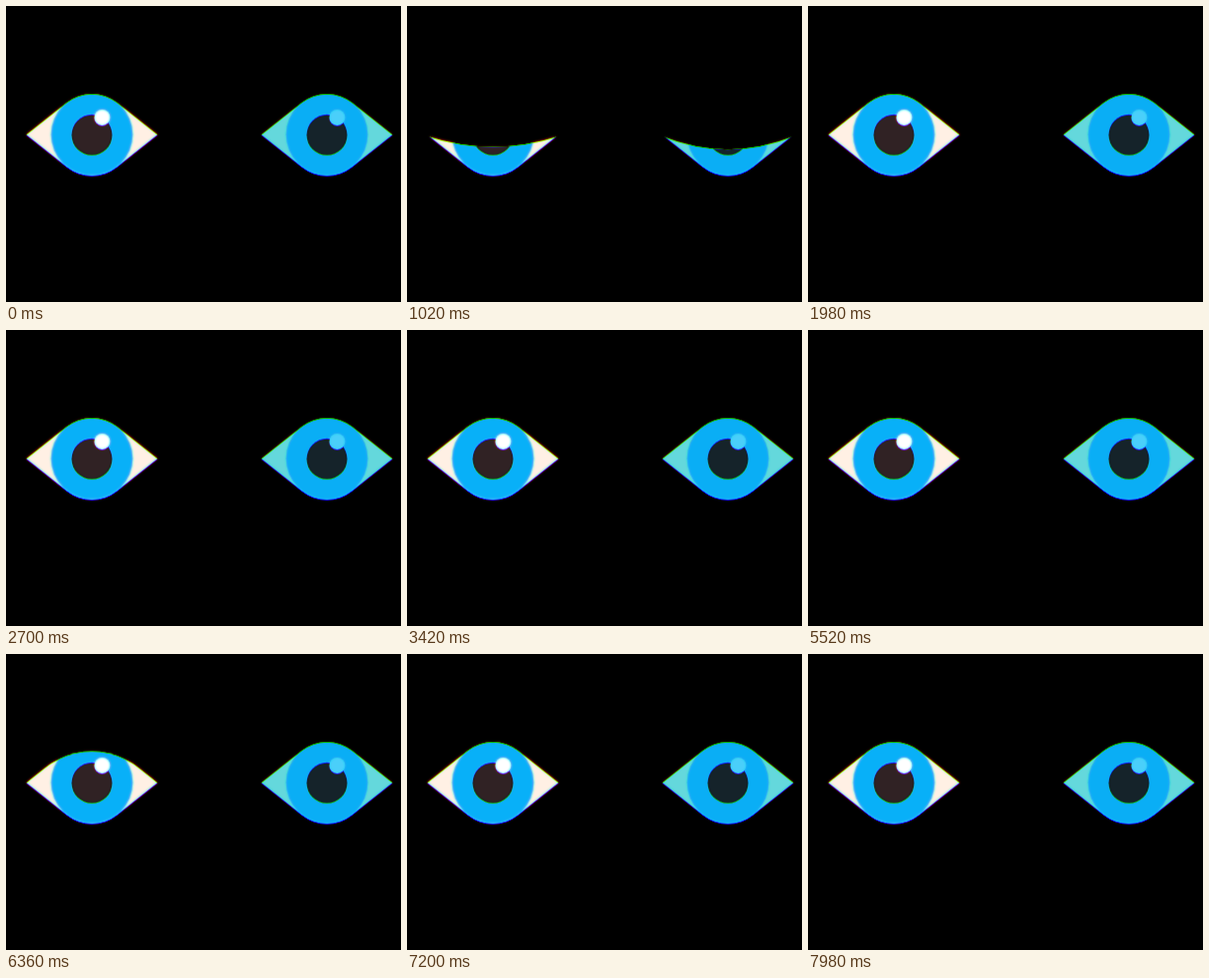
An HTML page for the animation above (8000 ms loop, 400x300 px).

```html
<!DOCTYPE html>
<html lang="en">
<head>
<meta charset="utf-8">
<title>Blinking eyes</title>
<style>
  html, body { margin: 0; width: 100%; height: 100%; overflow: hidden; background: #000; }
  svg { display: block; width: 100vw; height: 100vh; }
  .left { --white: #fff0e4; --iris: #08b0f8; --pupil: #302224; --glint: #fff; }
  .right { --white: #64d8dc; --iris: #0aaef5; --pupil: #15232a; --glint: #4acffa; }
  .white { fill: var(--white); }
  .iris { fill: var(--iris); }
  .pupil { fill: var(--pupil); }
  .glint { fill: var(--glint); }
</style>
</head>
<body>
<svg viewBox="0 0 400 300">
  <defs>
    <!-- Red spreads a little and blue sits low, giving coloured fringes -->
    <filter id="fringe" filterUnits="userSpaceOnUse" x="0" y="0" width="400" height="300" color-interpolation-filters="sRGB">
      <feGaussianBlur in="SourceGraphic" stdDeviation=".9" result="wide"/>
      <feGaussianBlur in="SourceGraphic" stdDeviation=".6" result="soft"/>
      <feColorMatrix in="wide" values="1 0 0 0 0  0 0 0 0 0  0 0 0 0 0  0 0 0 0 1" result="red"/>
      <feColorMatrix in="soft" values="0 0 0 0 0  0 1 0 0 0  0 0 0 0 0  0 0 0 0 1" result="green"/>
      <feColorMatrix in="soft" values="0 0 0 0 0  0 0 0 0 0  0 0 1 0 0  0 0 0 0 1"/>
      <feOffset dy="1" result="blue"/>
      <feBlend in="red" in2="green" mode="screen"/>
      <feBlend in2="blue" mode="screen"/>
    </filter>
    <clipPath id="outline">
      <path d="M-66.5 0 L-25.6 -32.5 A41.4 41.4 0 0 1 25.6 -32.5 L66.5 0 L25.6 32.5 A41.4 41.4 0 0 1 -25.6 32.5 Z"/>
    </clipPath>
    <clipPath id="lidLeft"><path/></clipPath>
    <clipPath id="lidRight"><path/></clipPath>
    <g id="eye" clip-path="url(#outline)">
      <rect class="white" x="-70" y="-45" width="140" height="90"/>
      <circle class="iris" r="41.4"/>
      <circle class="pupil" r="20.5"/>
      <circle class="glint" cx="10.4" cy="-17.4" r="8"/>
    </g>
  </defs>
  <g filter="url(#fringe)">
    <rect width="400" height="300"/>
    <g class="left" transform="translate(87 130.3)"><use href="#eye" clip-path="url(#lidLeft)"/></g>
    <g class="right" transform="translate(325 130.3)"><use href="#eye" clip-path="url(#lidRight)"/></g>
  </g>
</svg>
<script>
  const LOOP = 8000, STEP = 60;
  const CLOSE = 120, HOLD = 60, OPEN = 160;
  const RAISED = -100, LOWERED = 104;

  // The right eye blinks slightly more often and runs ahead
  const lids = [
    { path: document.querySelector('#lidLeft path'), first: 952, period: 2556 },
    { path: document.querySelector('#lidRight path'), first: 950, period: 2535 }
  ];

  const ease = u => (1 - Math.cos(Math.PI * Math.min(1, Math.max(0, u)))) / 2;

  // 0 is open, 1 is shut
  const blink = t => ease(t / CLOSE) - ease((t - CLOSE - HOLD) / OPEN);

  function draw(now) {
    const t = Math.floor((now % LOOP) / STEP) * STEP;
    for (const { path, first, period } of lids) {
      const shut = t < first ? 0 : blink((t - first) % period);
      const bend = RAISED + (LOWERED - RAISED) * shut;
      const corner = 2 * shut;
      path.setAttribute('d', `M-67 ${corner} Q0 ${bend} 67 ${corner} V60 H-67 Z`);
    }
  }

  let start;
  function tick(now) {
    start ??= now;
    draw(now - start);
    requestAnimationFrame(tick);
  }
  draw(0);
  requestAnimationFrame(tick);
</script>
</body>
</html>
```
